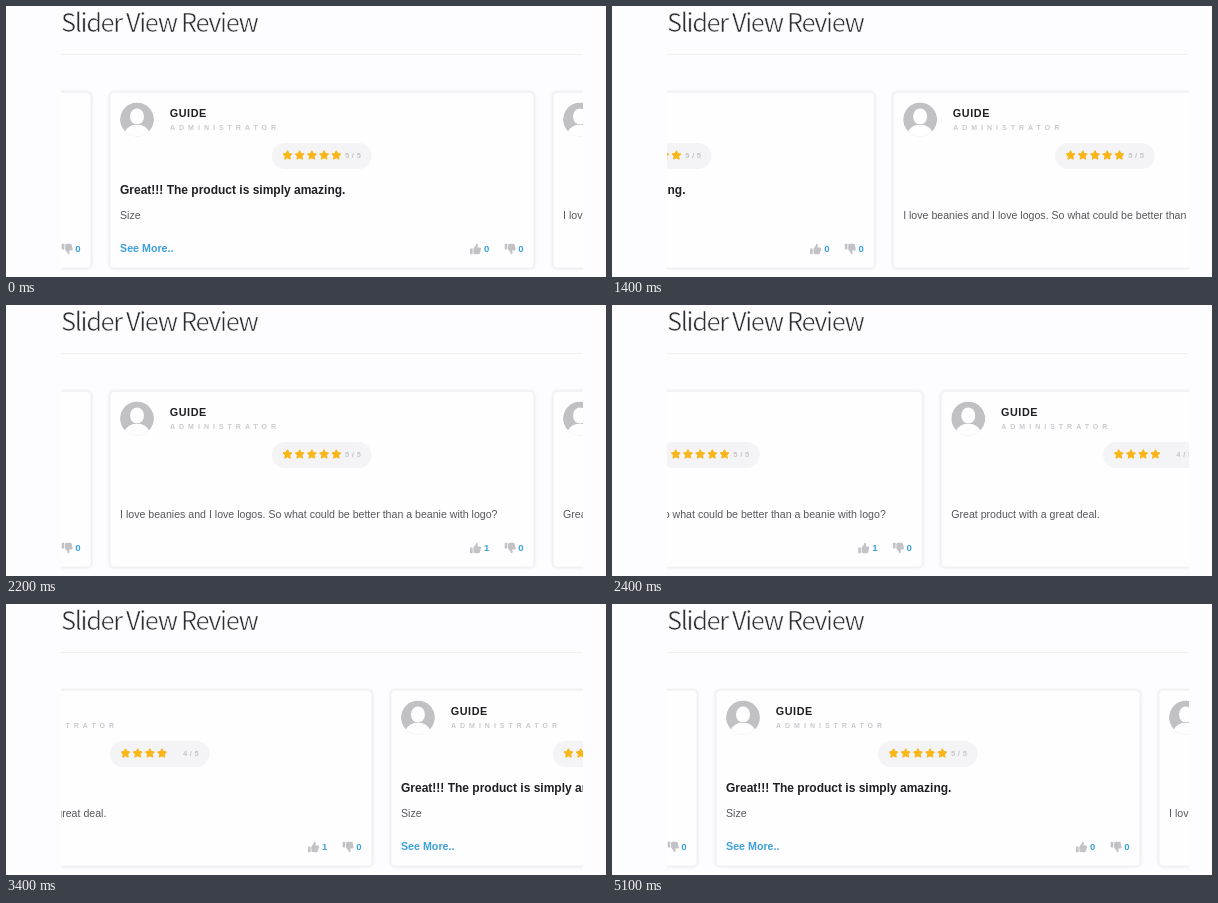
Recreate the animation shown at these times as an HTML page. Size 600 px wide and 271 px high, loop 6 s.

```html
<!DOCTYPE html>
<html lang="en">
<head>
<meta charset="utf-8">
<title>Slider View Review</title>
<style>
  html, body { margin: 0; height: 100%; overflow: hidden; background: #fdfcfe; }
  svg { display: block; width: 100vw; height: 100vh; }
  text { font-family: "Liberation Sans", Arial, sans-serif; white-space: pre; }
  .title {
    font: 400 25.4px "Noto Sans CJK JP", "Noto Sans CJK SC", "Noto Sans CJK", Lato, sans-serif;
    letter-spacing: -1.38px; fill: #2c2c33; stroke: #fdfcfe; stroke-width: .6px;
  }
  .card { fill: #fefdff; stroke: #f3f2f4; filter: drop-shadow(0 0 1.6px rgba(0, 0, 0, .12)); }
  .name { font-size: 10.8px; font-weight: 700; letter-spacing: .6px; fill: #1f1f23; }
  .role { font-size: 7px; font-weight: 700; letter-spacing: 4px; fill: #cac9cd; }
  .score { font-size: 7.5px; font-weight: 700; letter-spacing: 2.7px; fill: #c5c4c8; }
  .head { font-size: 12px; font-weight: 700; fill: #1f1f23; }
  .body { font-size: 10.6px; fill: #57575c; }
  .more { font-size: 10.7px; font-weight: 700; fill: #3ba1da; }
  .votes { font-size: 9.6px; font-weight: 700; fill: #3ba1da; }
  .star { fill: #fab517; stroke: #fab517; stroke-width: 1; stroke-linejoin: round; }
  .icon { fill: #c3c2c6; }
</style>
</head>
<body>
<svg viewBox="0 0 600 271">
  <defs>
    <clipPath id="view"><rect x="55" y="60" width="521.5" height="211"/></clipPath>
    <clipPath id="round"><circle r="17"/></clipPath>
    <g id="avatar" clip-path="url(#round)">
      <circle r="17" fill="#c1c0c3"/>
      <ellipse cy="-3" rx="7" ry="8" fill="#fefdff"/>
      <path d="M-13.5 17Q-12.5 8 -4 5.5H4Q12.5 8 13.5 17Z" fill="#fefdff"/>
    </g>
    <g id="thumb" class="icon">
      <rect y="-.5" width="2.6" height="5.8" rx=".4"/>
      <path d="M3.4-.4L5.7-3.6Q5.9-5.5 7-5.2Q8.5-4.7 7.4-1.5H10Q11.3-1.3 11-.1L9.9 4.2Q9.6 5.2 8.6 5.2H5L3.4 4.4Z"/>
    </g>
  </defs>
  <rect width="600" height="271" fill="#fdfcfe"/>
  <text class="title" x="55" y="26">Slider View Review</text>
  <path d="M55 48.5H576" stroke="#f1f0f3"/>
  <g clip-path="url(#view)"><g id="track"></g></g>
</svg>
<script>
  const PITCH = 443, LOOP = 6000, SLIDE = 550, TICK = 100;
  const STARTS = [1209, 2241, 3273];

  const reviews = [
    { stars: 5, head: 'Great!!! The product is simply amazing.', body: 'Size', more: 'See More..', up: 0 },
    { stars: 5, body: 'I love beanies and I love logos. So what could be better than a beanie with logo?', up: 1 },
    { stars: 4, body: 'Great product with a great deal.', up: 1 },
  ];

  const text = (cls, x, y, s) => s === undefined ? '' : `<text class="${cls}" x="${x}" y="${y}">${s}</text>`;

  const star = (cx, cy) => {
    const pts = Array.from({ length: 10 }, (_, i) => {
      const r = i % 2 ? 2.4 : 4.7, a = (i * 36 - 90) * Math.PI / 180;
      return `${(cx + r * Math.cos(a)).toFixed(2)},${(cy + r * Math.sin(a)).toFixed(2)}`;
    });
    return `<polygon class="star" points="${pts.join(' ')}"/>`;
  };

  const card = (r, slot) => `<g transform="translate(${slot * PITCH})">
    <rect class="card" x="104" y="86.5" width="424" height="175.5" rx="4"/>
    <use href="#avatar" x="131" y="113.5"/>
    ${text('name', 163.7, 110.5, 'GUIDE')}
    ${text('role', 164, 124.3, 'ADMINISTRATOR')}
    <rect x="266" y="137" width="99.5" height="26" rx="13" fill="#f4f3f5"/>
    ${Array.from({ length: r.stars }, (_, i) => star(281.5 + i * 12.2, 149.4)).join('')}
    ${text('score', 339, 152, r.stars + '/5')}
    ${text('head', 114, 188, r.head)}
    ${text('body', 114, 213, r.body)}
    ${text('more', 114, 246.3, r.more)}
    <use href="#thumb" x="464" y="243"/>
    ${text('votes', 478, 246, r.up)}
    <use href="#thumb" transform="translate(498.7 243) scale(1 -1)"/>
    ${text('votes', 512.3, 246, 0)}
  </g>`;

  const track = document.getElementById('track');
  track.innerHTML = [-1, 0, 1, 2, 3, 4].map(i => card(reviews[(i + 3) % 3], i)).join('');

  const at = (ms, n, easing = 'linear') =>
    ({ offset: ms / LOOP, transform: `translateX(${-n * PITCH}px)`, easing });
  const steps = STARTS.flatMap((ms, i) => [at(ms, i, 'ease'), at(ms + SLIDE, i + 1)]);
  const slide = track.animate([at(0, 0), ...steps, at(LOOP, 3)], { duration: LOOP, fill: 'both' });
  slide.pause();

  // The picture advances ten times a second.
  const draw = () => {
    slide.currentTime = Math.floor(performance.now() % LOOP / TICK) * TICK;
    requestAnimationFrame(draw);
  };
  draw();
</script>
</body>
</html>
```
